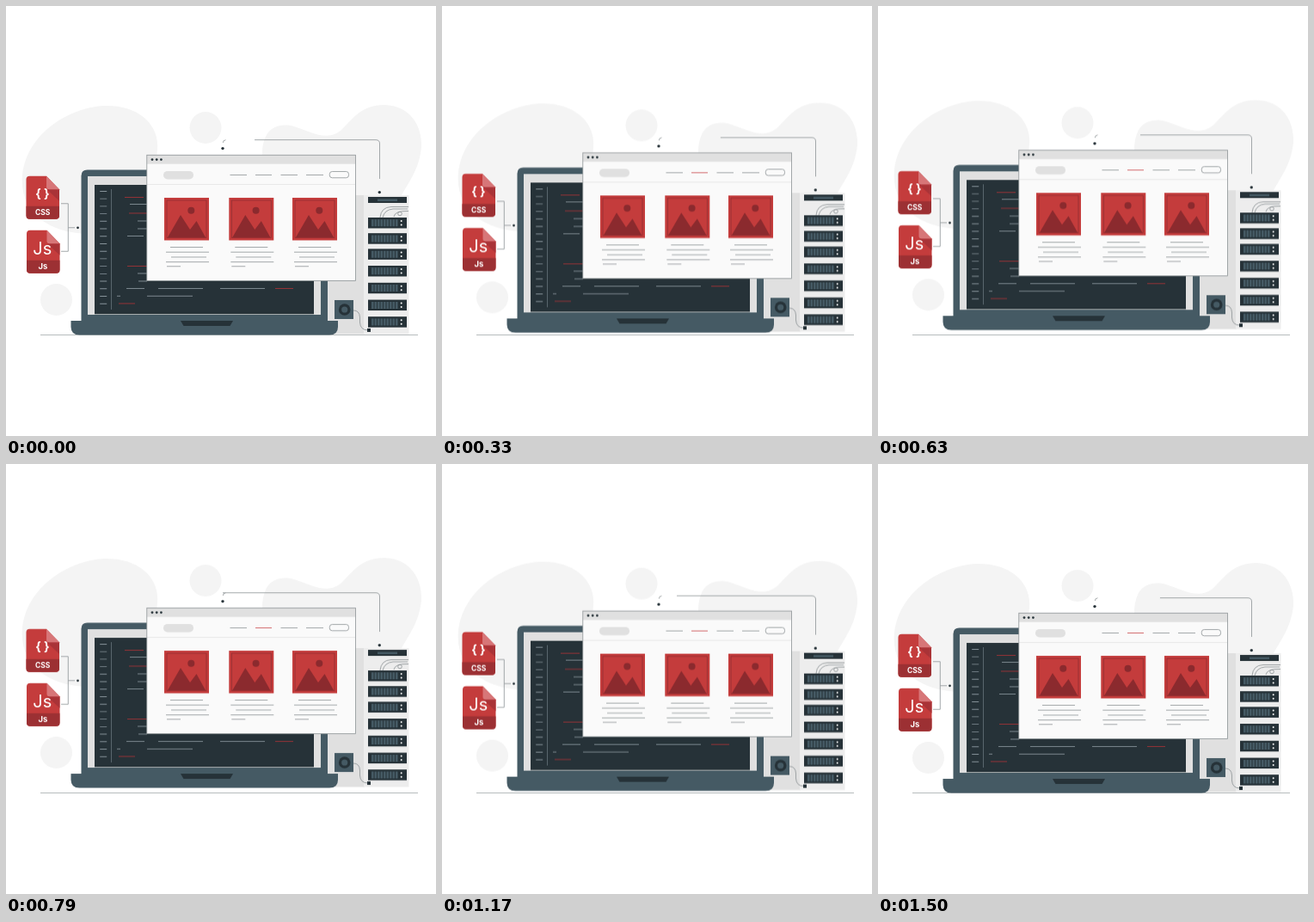
An HTML page without scripts for the animation above (1.54 s loop, 500 px wide and 500 px high).

```html
<!DOCTYPE html>
<html lang="en">
<head>
<meta charset="utf-8">
<title>Web development</title>
<style>
  html, body { margin: 0; width: 100%; height: 100%; overflow: hidden; background: #fff; }
  svg { display: block; width: 100%; height: 100%; }
  text { font-family: Inter, Roboto, sans-serif; fill: #fff; text-anchor: middle; }
  .blob { fill: #f4f4f4; }
  .light { fill: #e0e0e0; }
  .slate { fill: #455a64; }
  .dark { fill: #263238; }
  .red { fill: #c43c3c; }
  .maroon { fill: #8b2a2e; }
  .line { fill: none; stroke: #8d9396; stroke-width: .8; }
  .code { fill: none; stroke: #87939a; stroke-width: .9; }
  .code.accent { stroke: #a23438; }
  .bold { font-weight: 700; }

  .float { animation: float 770ms cubic-bezier(.37, 0, .63, 1) -30ms infinite alternate; }
  @keyframes float {
    from { transform: translateY(6px); }
    to { transform: translateY(0); }
  }

  .cable { animation: cable 1540ms linear infinite; }
  @keyframes cable {
    0%, 100% { stroke-dasharray: 189 400; }
    21.4% { stroke-dasharray: 154 400; }
    41% { stroke-dasharray: 173 400; }
    51%, 66% { stroke-dasharray: 232 400; }
    86.4% { stroke-dasharray: 177 400; }
    97.4% { stroke-dasharray: 149 400; }
  }

  .current { stroke: #c9484b; animation: current 1540ms step-end infinite; }
  @keyframes current {
    0%, 80% { stroke: #8d9396; }
    2.6%, 93% { stroke: #c9484b; }
  }
</style>
</head>
<body>
<svg viewBox="0 0 500 500">
  <defs>
    <g id="unit">
      <rect class="dark" x="421" width="45" height="12.5"/>
      <path d="M425 6.3H456" stroke="#455a64" stroke-width="8" stroke-dasharray="2.6 .9"/>
      <circle cx="459.7" cy="4" r="1" fill="#fff"/>
      <circle cx="459.7" cy="8.5" r="1" fill="#fff"/>
    </g>
    <g id="card">
      <rect class="red" width="52" height="49.5"/>
      <rect x="3" y="3" width="46" height="43.5" fill="none" stroke="#8b2a2e" stroke-width=".7"/>
      <circle class="maroon" cx="31.3" cy="14.8" r="4"/>
      <path class="maroon" d="M4 46L19 20L30 37L37.5 27L48 46Z"/>
      <path class="line" d="M7 57.5H45M2 63.2H52M8 69H49M2 74.7H52M3 79.8H19"/>
    </g>
    <g id="file">
      <path class="red" d="M4 0H23.5L38.5 15.5V46Q38.5 50 34.5 50H4Q0 50 0 46V4Q0 0 4 0Z"/>
      <path d="M24 15.5H38.5V29Z" fill="#a93337"/>
      <path d="M23.5 0L38.5 15.5H26.5Q23.5 15.5 23.5 12.5Z" fill="#d77678"/>
      <path d="M0 35H38.5V46Q38.5 50 34.5 50H4Q0 50 0 46Z" fill="#9c3033"/>
    </g>
  </defs>

  <path d="M40 382.5H479" stroke="#a5abad" stroke-width=".8"/>

  <g class="float">
    <!-- backdrop -->
    <path class="blob" d="M19 190C24 142 75 110 118 110C152 110 178 130 176 160C174 190 170 215 150 230L92 259C50 257 15 235 19 190Z"/>
    <circle class="blob" cx="232" cy="135.5" r="18.5"/>
    <circle class="blob" cx="58.5" cy="335.5" r="18.5"/>
    <path class="blob" d="M298 170C297 142 310 128 335 134C355 140 372 152 389 139C402 127 412 109 440 109C470 110 484 133 483 158C480 190 462 205 455 225L400 230L300 200Z"/>

    <!-- server -->
    <rect class="light" x="366" y="214" width="51" height="161.5"/>
    <rect x="416" y="214" width="52.5" height="161.5" fill="#ededed"/>
    <rect class="dark" x="421" y="216" width="45" height="7"/>
    <rect class="slate" x="432" y="218.5" width="23" height="2.5"/>
    <path class="line" d="M435 240Q436 228 448 227.5H468M438 240Q440 231 450 230H467M451 239Q452 232 468 232.5"/>
    <circle class="line" cx="458" cy="235.5" r="2.3"/>
    <use href="#unit" y="240"/>
    <use href="#unit" y="258.2"/>
    <use href="#unit" y="276.4"/>
    <use href="#unit" y="296"/>
    <use href="#unit" y="315.8"/>
    <use href="#unit" y="335.6"/>
    <use href="#unit" y="355.2"/>
    <rect class="slate" x="382" y="336" width="22" height="22"/>
    <circle class="dark" cx="393.7" cy="347" r="6.8"/>
    <circle class="slate" cx="393.7" cy="347" r="3.6"/>
    <path class="line" d="M404 348Q411 348 411.5 356V362Q412 371 421 371"/>
    <rect class="dark" x="420" y="369" width="4" height="4"/>

    <!-- laptop -->
    <path class="slate" d="M87.5 361V191.5Q87.5 184.5 94.5 184.5H367Q374 184.5 374 191.5V361Z"/>
    <rect class="light" x="95" y="192" width="271" height="161"/>
    <rect class="dark" x="103" y="202" width="255" height="150.3"/>
    <path class="slate" d="M75.5 360H386V367Q386 376.5 376 376.5H85.5Q75.5 376.5 75.5 367Z"/>
    <path class="dark" d="M203 360H264L260.5 366H206.5Z"/>
    <path d="M113.2 209V341" stroke="#87939a" stroke-width="8" stroke-dasharray=".9 7.82"/>
    <path class="code" stroke-opacity=".6" d="M122.5 207V347"/>
    <path class="code" d="M144 224.5H164M153 244H164M153 253H164M141 261.5H160M153 305H164M154 314H164M140 322.5H161M177 322.5H229M249 322.5H301M129 331.3H133M164 331.3H217"/>
    <path class="code accent" d="M138 216.5H160M143 235H164M141 296.5H164M313 322.5H334M131 340H150"/>

    <!-- browser window -->
    <rect x="163.8" y="167.3" width="242.7" height="146.2" fill="#fafafa"/>
    <rect class="light" x="163.8" y="167.3" width="242.7" height="10.4"/>
    <path d="M164 201.5H406" stroke="#e4e4e4" stroke-width=".8"/>
    <rect class="line" x="163.8" y="167.3" width="242.7" height="146.2"/>
    <g class="dark">
      <circle cx="170" cy="172.6" r="1.4"/>
      <circle cx="175.2" cy="172.6" r="1.4"/>
      <circle cx="180.4" cy="172.6" r="1.4"/>
    </g>
    <rect class="light" x="183" y="186" width="35" height="9.5" rx="4.75"/>
    <path class="line" d="M260.5 190.5H280M319.5 190.5H339M349 190.5H369"/>
    <path class="line current" d="M290 190.5H309"/>
    <rect class="line" x="376.3" y="186.5" width="22.2" height="7.3" rx="3"/>
    <use href="#card" x="184" y="217"/>
    <use href="#card" x="259.3" y="217"/>
    <use href="#card" x="333" y="217"/>

    <!-- files -->
    <use href="#file" x="23.5" y="191.7"/>
    <text class="bold" x="42.4" y="217.5" font-size="14">{ }</text>
    <text class="bold" x="42.6" y="236.6" font-size="8.5">CSS</text>
    <use href="#file" x="24" y="254.8"/>
    <text x="42.3" y="283.5" font-size="20">Js</text>
    <text class="bold" x="43" y="300" font-size="9.5">Js</text>

    <!-- connectors -->
    <path class="line" d="M64 223.8H72.3V279.3H64M72.3 251.8H80"/>
    <circle class="dark" cx="83.5" cy="251.8" r="1.4"/>
    <path class="line" d="M252.3 153Q252.3 150 255.5 149.8"/>
    <path class="line cable" d="M434.5 195V154Q434.5 149.7 430 149.7H252"/>
    <circle class="dark" cx="252" cy="159.6" r="1.7"/>
    <circle class="dark" cx="434.3" cy="210.6" r="1.7"/>
  </g>
</svg>
</body>
</html>
```
